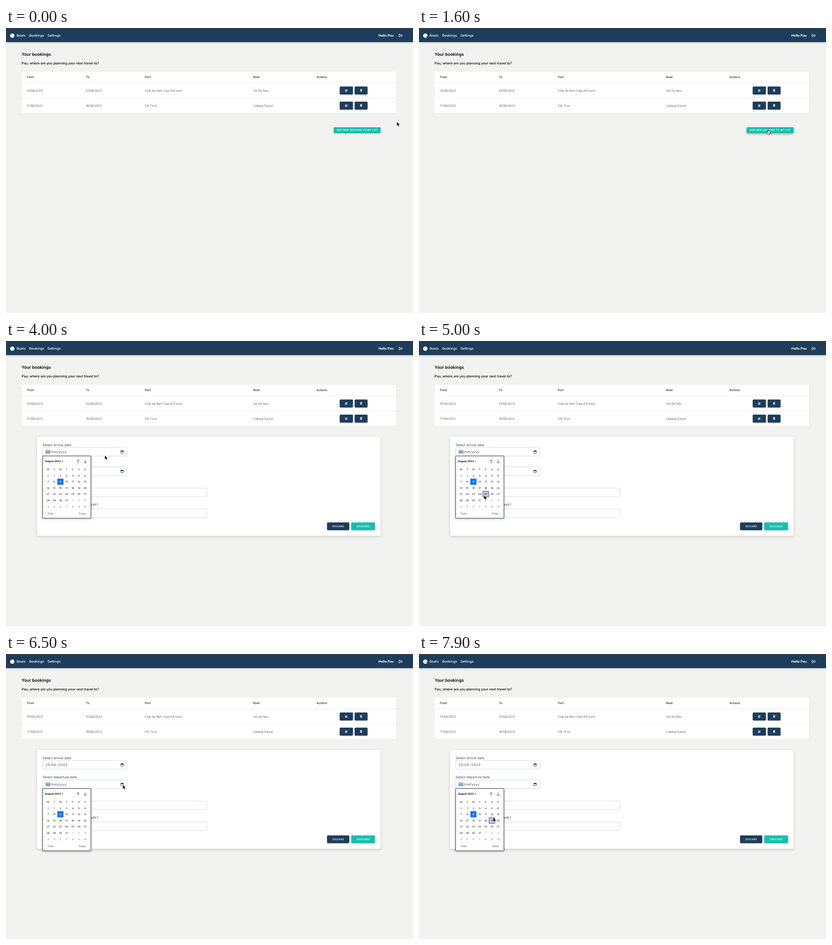
Recreate the animation shown at these times as an HTML page. Size 894x626 px, loop 8000 ms.

```html
<!DOCTYPE html>
<html lang="en">
<head>
<meta charset="utf-8">
<title>Your bookings</title>
<style>
html, body { margin: 0; width: 100%; height: 100%; overflow: hidden; background: #f2f2f1; }
svg { display: block; font-family: Inter, sans-serif; text-rendering: geometricPrecision; }
.nav { font-size: 7.4px; font-weight: 500; fill: #fff; }
.head { font-size: 6.47px; font-weight: 500; fill: #1c1c1c; }
.cell { font-size: 6.47px; font-weight: 300; fill: #333; }
.label { font-size: 7.4px; fill: #444b55; }
.value { font-size: 7.4px; fill: #484848; }
.date { font-size: 7.4px; fill: #555; letter-spacing: .12px; font-feature-settings: "tnum"; }
.btn { font-size: 5.55px; font-weight: 500; fill: #fff; letter-spacing: .139px; text-anchor: middle; }
.day { font-size: 5.5px; fill: #111; text-anchor: middle; }
.navy { fill: #1d3d5b; }
.teal { fill: #15bfae; }
.box { fill: #fff; stroke: #ccced1; stroke-width: .8; }
.soft { filter: drop-shadow(0 1px 1px rgba(0,0,0,.22)); }
.lift { filter: drop-shadow(0 2px 2.5px rgba(0,0,0,.32)); }
.line { fill: none; stroke-linecap: round; stroke-linejoin: round; }
</style>
</head>
<body>
<svg id="stage" width="894" height="626" viewBox="0 0 894 626"></svg>
<script>
const LOOP = 8000, STEP = 100;
const OPEN_1 = 3600, PICKED = 5500, FOCUS_2 = 6300, OPEN_2 = 6500, FORM_AT = 2000;
const CAL = { left: 85.7, top: 288.7, w: 13.55, h: 13.6, shift: 43 };

// Pointer stops: time, x, y
const stops = [
  [0, 858.5, 206], [400, 750.5, 149], [500, 750.5, 152], [800, 778, 213], [900, 778, 213],
  [1200, 729, 149], [1600, 767, 223], [2400, 767, 223], [2600, 471, 246], [2700, 471, 246],
  [2800, 442, 247], [3600, 256.5, 245], [3900, 256.5, 245], [4000, 217, 251], [4700, 143, 338],
  [4900, 143, 338], [5100, 142.5, 339.5], [5400, 142.5, 339.5], [5900, 239, 276],
  [6300, 256.5, 287], [6600, 256.5, 287], [7200, 150.5, 385.5], [7500, 133, 360], [7900, 163, 359]
];

const user = "Pau", port = "CN Tirvo", boat = "Llebeig Daurat";
const bookings = [
  ["01/08/2023", "01/08/2023", "Club de Rem Cala d'Ervonil", "Sol De Neu"],
  ["17/08/2023", "18/08/2023", port, boat]
];
const columns = [46, 175.5, 305, 543, 682];

const text = (cls, x, y, s, extra = "") => `<text class="${cls}" x="${x}" y="${y}" ${extra}>${s}</text>`;
const rect = (cls, x, y, w, h, r = 0, extra = "") =>
  `<rect class="${cls}" x="${x}" y="${y}" width="${w}" height="${h}" rx="${r}" ${extra}/>`;
const path = (d, color, width, extra = "") =>
  `<path class="line" d="${d}" stroke="${color}" stroke-width="${width}" ${extra}/>`;
const at = (x, y, s) => `<g transform="translate(${x} ${y})">${s}</g>`;

const editIcon = path("M.2-1.8H-2V2.2H2V.6", "#fff", .8) + path("M-.5.7 2-1.8", "#fff", 1.3);
const trashIcon = path("M-2.2-2H2.2M-.7-2.6H.7", "#fff", .8) +
  '<path d="M-1.9-1.2H1.9L1.7 2.7H-1.7Z" fill="#fff"/>' +
  path("M-.8-.4V1.9M0-.4V1.9M.8-.4V1.9", "#1d3d5b", .3);
const dateIcon = rect("", -2.7, -2.2, 5.4, 5, .4, 'fill="none" stroke="#111" stroke-width=".8"') +
  rect("", -3, -2.6, 6, 1.8, .3, 'fill="#111"') + path("M-1.6-3V-2.4M1.6-3V-2.4", "#111", .8);

function header() {
  return '<rect width="894" height="31" class="navy" style="filter:drop-shadow(0 1.5px 2.5px rgba(0,0,0,.2))"/>' +
    rect("", 0, 0, 894, 1.6, 0, 'fill="#3b3d3f"') +
    '<circle cx="13.8" cy="16.8" r="4.8" fill="#fff"/>' +
    text("nav", 23.2, 19.4, "Boats") + text("nav", 51, 19.4, "Bookings") + text("nav", 91, 19.4, "Settings") +
    text("nav", 851.7, 19.4, "Hello " + user, 'text-anchor="end" style="font-weight:700"') +
    at(867, 16.6, path("M-1.2-3H-3.1Q-3.7-3-3.7-2.4V2.4Q-3.7 3-3.1 3H-1.2", "#fff", 1) +
      path("M-1.2 0H2", "#fff", 1.5) + '<path d="M1.2-2.7 4.2 0 1.2 2.7Z" fill="#fff"/>');
}

function table() {
  let s = text("", 34.3, 61, "Your bookings", 'font-size="9.25" font-weight="600"') +
    text("", 34.3, 80.4, user + ", where are you planning your next travel to?", 'font-size="7.4" font-weight="500"') +
    rect("", 34.3, 96, 822.4, 90, 0, 'fill="#fff" style="filter:drop-shadow(0 .5px .6px rgba(0,0,0,.14))"');
  ["From", "To", "Port", "Boat", "Actions"].forEach((h, i) => s += text("head", columns[i], 110, h));
  bookings.forEach((row, r) => {
    const y = 137.3 + 33.2 * r;
    s += rect("", 34.3, 120.2 + 33.2 * r, 822.4, .8, 0, 'fill="#e3e5e8"');
    row.forEach((v, i) => s += text("cell", columns[i], y + 2.3, v));
    s += rect("navy soft", 733, y - 8.7, 29, 17.4, 2) + at(747.2, y, editIcon) +
      rect("navy soft", 765.8, y - 8.7, 28.4, 17.4, 2) + at(780, y - .2, trashIcon);
  });
  return s;
}

const addButton = hover => rect("teal " + (hover ? "lift" : "soft"), 719.8, 218, 103, 13, 2) +
  text("btn", 771.2, 226.2, "ADD NEW BOOKING TO MY LIST");

function dateField(y, label, value, focused) {
  const [d, m, yr] = value.split("/");
  return text("label", 80.3, y - 12.8, label) + rect("box", 80.5, y - 9.6, 185.3, 19.2, 2) +
    (focused ? rect("", 86.5, y - 4.6, 10.6, 9.4, 0, 'fill="#a8cdf7"') : "") +
    text("date", 87, y + 2.8, d) + text("date", 97, y + 2.8, "/" + m) + text("date", 112.8, y + 2.8, "/" + yr) +
    at(255, y + .2, dateIcon);
}

const choice = (y, label, value) => text("label", 80.3, y - 16.5, label) +
  rect("box", 80.5, y - 9.3, 360.8, 18.6, 2) + text("value", 86.5, y + 2.7, value);

function form(t) {
  const blank = "dd/mm/yyyy";
  return rect("", 68.3, 210.4, 754.4, 217.4, 3, 'fill="#fff" style="filter:drop-shadow(0 2px 3px rgba(0,0,0,.16))"') +
    dateField(243.3, "Select arrival date", t < PICKED ? blank : "25/08/2023", t >= OPEN_1 && t < FOCUS_2) +
    dateField(286.2, "Select departure date", blank, t >= FOCUS_2) +
    choice(332.4, "Where would you like to stay?", port) +
    choice(378, "Which boat are you travelling with?", boat) +
    rect("navy soft", 705.2, 398.6, 48.8, 17, 2) + text("btn", 729.7, 409, "DISCARD") +
    rect("teal soft", 758.3, 398.6, 52.2, 17, 2) + text("btn", 784.4, 409, "SAVE/ADD");
}

function calendar(dy, [px, py]) {
  const col = Math.floor((px + 1 - CAL.left) / CAL.w);
  const row = Math.floor((py + 1.5 - dy - CAL.top) / CAL.h);
  const hot = col >= 0 && col < 7 && row >= 0 && row < 6 ? row * 7 + col : -1;
  const today = 9;
  let s = rect("", 80.5, 252.6, 106, 136.6, .5,
    'fill="#fff" stroke="#222" stroke-width=".9" style="filter:drop-shadow(0 1.5px 2.5px rgba(0,0,0,.3))"') +
    text("", 85.8, 266.3, "August 2023", 'font-size="5.4" font-weight="700"') +
    '<path d="M122.4 263.4H125.8L124.1 265.5Z" fill="#222"/>' +
    path("M158.4 268.2V261M155.2 264.2 158.4 261 161.6 264.2", "#333", .8) +
    path("M173.9 260.8V268.2M170.7 265 173.9 268.2 177.1 265", "#333", .8);
  const mid = i => CAL.left + CAL.w * (i + .5);
  [..."MTWTFSS"].forEach((c, i) => s += text("day", mid(i), 283.5, c));
  for (let k = 0; k < 42; k++) {
    const c = k % 7, r = Math.floor(k / 7), outside = k < 1 || k > 31;
    const x = CAL.left + c * CAL.w, y = CAL.top + r * CAL.h;
    if (k === today) s += rect("", x, y, 13.4, 13.5, 0, 'fill="#0075ff"');
    else if (k === hot) s += rect("", x + .5, y + .5, 12.6, 12.6, .5, 'fill="#b9d3f5" stroke="#222" stroke-width=".9"');
    const look = k === today ? "fill:#fff;font-weight:700" : outside ? "fill:#777" : "";
    s += text("day", mid(c), y + 8.8, k < 1 ? 31 : k > 31 ? k - 31 : k, `style="${look}"`);
  }
  const link = 'style="fill:#0068d6"';
  return at(0, dy, s + text("day", 98.2, 381, "Clear", link) + text("day", 167.5, 381, "Today", link));
}

const arrow = '<path d="M0 0V9.6L2.2 7.6 3.7 11 5.4 10.3 3.9 7H6.9Z" fill="#000" stroke="#fff" stroke-width=".7" stroke-linejoin="round"/>';
const hand = '<path d="M-1.1.3Q-1-.5-.3-.5.5-.5.6.4V3.3Q1.4 2.8 2 3.5 2.8 3.1 3.3 3.9 4.5 3.6 4.5 5V7Q4.4 8.4 3.7 9.4V10.3H-.9V9.4Q-2.1 8.2-3.2 6.2-3.7 5.2-3 5-2.2 4.8-1.1 6.2Z" fill="#fff" stroke="#000" stroke-width=".8" stroke-linejoin="round"/>' +
  path("M.4 6.4V8.6M1.7 6.4V8.6M3 6.4V8.6", "#000", .4);

function pointerAt(t) {
  const i = stops.findIndex(s => s[0] > t);
  if (i < 0) return stops[stops.length - 1].slice(1);
  const [t0, x0, y0] = stops[i - 1], [t1, x1, y1] = stops[i];
  const k = (t - t0) / (t1 - t0);
  return [x0 + (x1 - x0) * k, y0 + (y1 - y0) * k];
}

const inside = ([x, y], l, t, r, b) => x >= l && x <= r && y >= t && y <= b;

const backdrop = '<rect width="894" height="626" fill="#f2f2f1"/>' + header() + table();
const stage = document.getElementById("stage");
stage.innerHTML = `<g>${backdrop}</g><g id="live"></g>`;
const live = document.getElementById("live");
let shown = -1;

function render(t) {
  const p = pointerAt(t);
  const onAdd = t < FORM_AT && inside(p, 720, 218, 823, 231);
  const onAction = [128.6, 161.8].some(y => inside(p, 733, y, 762, y + 17.4) || inside(p, 766, y, 794, y + 17.4));
  let s = t < FORM_AT ? addButton(onAdd) : form(t);
  if (t >= OPEN_1 && t < PICKED) s += calendar(0, p);
  if (t >= OPEN_2) s += calendar(CAL.shift, p);
  live.innerHTML = s + at(p[0], p[1], onAdd || onAction ? hand : arrow);
}

const start = performance.now();
function tick() {
  const t = Math.floor(((performance.now() - start) % LOOP) / STEP) * STEP;
  if (t !== shown) render(shown = t);
  requestAnimationFrame(tick);
}
tick();
</script>
</body>
</html>
```
